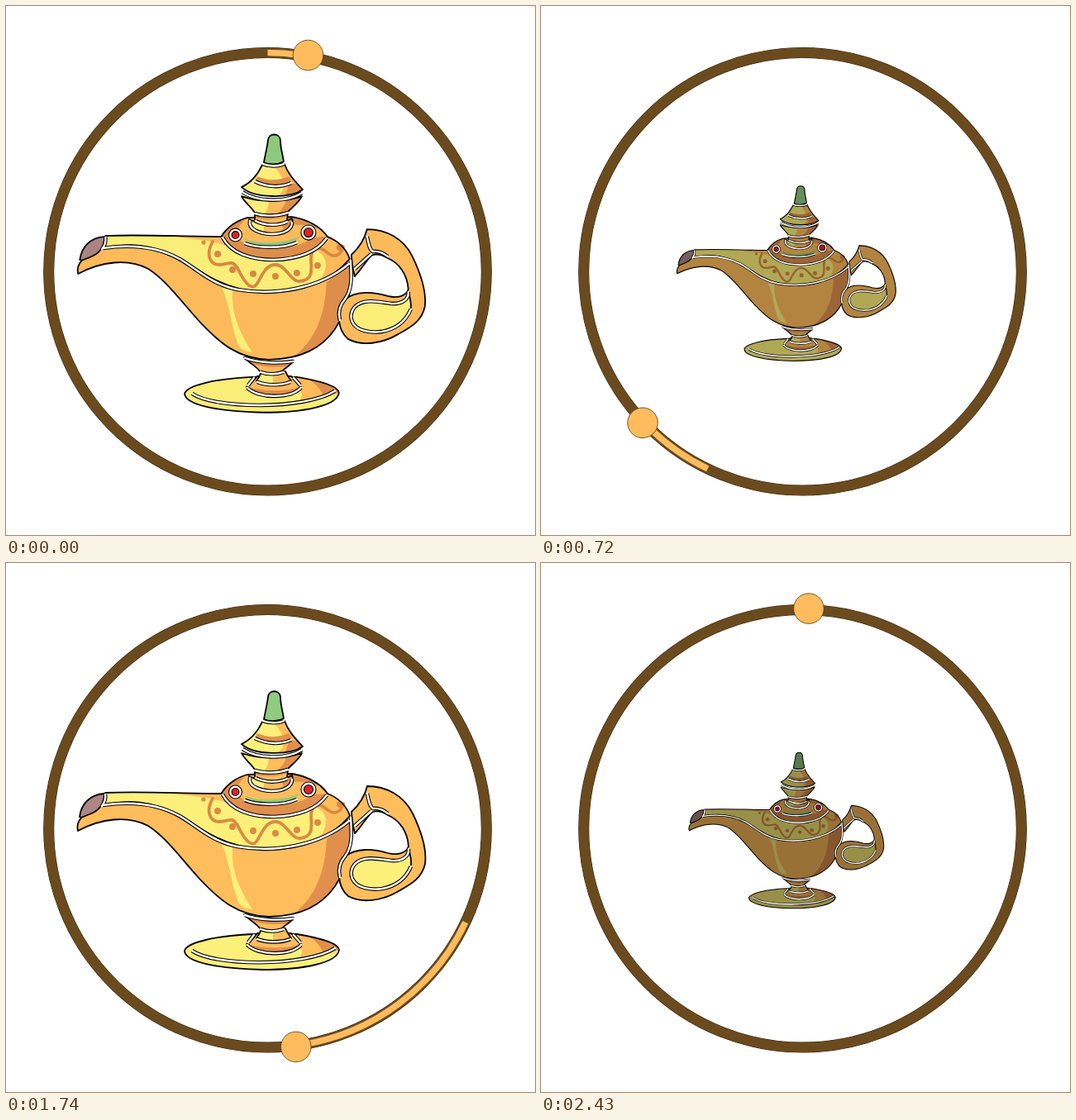
Write an HTML page that moves like this. It is 640 by 640 pixels and loops after 2.52 s.

```html
<!DOCTYPE html>
<html lang="en">
<head>
<meta charset="utf-8">
<title>Lamp loader</title>
<style>
  html, body { margin: 0; width: 100%; height: 100%; overflow: hidden; background: #fff; }
  svg { display: block; width: 100vw; height: 100vh; }
  .o { fill: var(--o); } .y { fill: var(--y); } .s { fill: var(--s); }
  .g { fill: var(--g); } .r { fill: var(--r); } .n { fill: var(--n); }
  .swirl { fill: none; stroke: var(--d); stroke-width: 3.8; stroke-linecap: round; }
  .dots { fill: var(--d); }
  .line { fill: none; stroke: #000; stroke-width: 1.8; stroke-linejoin: round; }
  .edge { fill: none; stroke: #000; stroke-width: 4.6; }
  .gap { fill: none; stroke: #fff; stroke-width: 2.4; stroke-linecap: round; }
</style>
</head>
<body>
<svg viewBox="0 0 640 640">
  <g fill="none">
    <circle cx="316.5" cy="321.3" r="264.8" stroke="#2c1e0c" stroke-width="13"/>
    <circle cx="316.5" cy="321.3" r="264.8" stroke="#6b4b1e" stroke-width="12"/>
    <circle id="trail" cx="316.5" cy="321.3" r="264.8" stroke="#ffbc5e" stroke-width="7.6"
      pathLength="360" transform="rotate(-90 316.5 321.3)"/>
  </g>
  <circle id="dot" r="18.3" fill="#ffbc5e" stroke="#54390f" stroke-width=".8"/>
  <g id="lamp"></g>
</svg>
<script>
const $ = id => document.getElementById(id);
const LOOP = 2520, STEP = 30, LAST = 2430;

const colors = {
  o: [255, 189, 92], y: [253, 240, 122], s: [224, 144, 76], g: [143, 203, 128],
  r: [224, 32, 42], n: [171, 134, 133], d: [218, 139, 66]
};

// Outlined parts, back to front: [fill class, path, shading as [class, path] pairs]
const parts = [
  ['o', 'M87 324C85 316 88 310 95 305C103 299 109 294 118 293C150 288 178 291 205 305C230 319 248 335 275 342C320 352 372 345 417 311C420 340 413 368 398 391C382 414 358 427 318 428C280 427 258 407 236 384C212 358 195 333 172 318C147 305 115 309 87 324Z', [
    ['s', 'M388 334C386 372 376 404 346 426C382 418 402 388 412 364C419 342 419 328 417 311Z'],
    ['y', 'M261 341L274 344C272 372 283 396 298 419C290 418 284 416 281 410C272 389 272 364 261 341Z']]],
  ['y', 'M120 278C165 276 212 279 258 279L389 279C402 284 412 294 416 306C388 338 350 347 317 347C285 346 258 336 235 321C207 303 185 290 150 289C138 289 129 291 117 293Z', [
    ['o', 'M203 279L262 279L268 291C256 285 236 283 203 279Z'],
    ['o', 'M388 280C402 284 412 294 416 306C406 318 393 327 380 333C390 316 391 302 372 294Z'],
    ['swirl', 'M250 285C241 301 247 313 258 313C270 313 273 305 281 319C288 333 296 345 303 337C309 329 313 313 326 313C339 313 345 335 356 333C381 330 361 302 374 294C385 289 388 303 398 302C405 301 407 296 408 291']]],
  ['n', 'M89 307C91 292 101 280 119 279C119 292 112 300 101 304C95 306 91 309 89 307Z'],
  ['o', 'M261 278C268 267 280 259 292 256L346 255C365 258 381 267 389 279C381 294 366 302 346 306C316 311 276 304 261 278Z', [
    ['s', 'M261 278C268 267 280 259 292 256C282 264 276 274 284 284C306 300 352 295 372 280L389 279C381 294 366 302 346 306C316 311 276 304 261 278Z'],
    ['s', 'M334 262L346 255C360 257 372 263 378 269C360 263 348 266 334 262Z'],
    ['g', 'M287 281C305 289 335 288 355 279C348 292 302 295 287 281Z']]],
  ['y', 'M294 258C308 265 334 264 346 257C349 265 345 271 337 274C324 278 306 276 296 269Z', [
    ['o', 'M312 263C324 264 338 262 346 257C349 265 345 271 337 274C329 276 320 276 312 275Z'],
    ['s', 'M333 262L346 257C349 265 345 271 337 274Z']]],
  ['o', 'M301 250C313 254 330 253 341 249L340 261C328 266 312 266 301 261Z', [
    ['s', 'M301 250C313 254 330 253 341 249L341 254C328 259 313 259 301 256Z']]],
  ['o', 'M285 230C304 237 336 238 358 230C355 237 347 243 341 249C330 253 312 254 301 250C297 243 288 237 285 230Z', [
    ['y', 'M285 230C295 234 306 236 318 236C318 242 316 247 313 251L301 250C297 243 288 237 285 230Z'],
    ['s', 'M339 234L358 230C355 237 347 243 341 249L326 252C334 247 338 240 339 234Z']]],
  ['y', 'M310 192C318 195 329 195 337 191C342 205 351 213 359 222C343 233 300 233 285 219C298 213 305 203 310 192Z', [
    ['o', 'M324 194L337 191C342 205 351 213 359 222C351 227 340 230 328 230C341 223 337 206 324 194Z'],
    ['s', 'M304 206C318 212 330 211 342 206L346 211C332 219 314 219 301 212Z'],
    ['s', 'M343 214L352 215L359 222L338 229Z']]],
  ['g', 'M312 189C314 178 316 171 317 162C318 153 331 153 332 162C332 172 335 180 336 188C329 192 318 192 312 189Z'],
  ['y', 'M216 469C219 459 254 451 298 449L352 449C376 453 402 459 403 468C401 484 360 492 310 492C258 491 216 483 216 469Z', [
    ['o', 'M330 449L352 449C376 453 402 459 403 468C390 474 374 478 352 480C360 474 366 465 330 449Z'],
    ['s', 'M368 453C386 456 402 461 403 468L384 471C380 464 376 458 368 453Z']]],
  ['o', 'M291 461C297 457 301 452 304 448L345 448C350 453 354 456 357 461C344 476 304 476 291 461Z', [
    ['s', 'M291 461C312 467 338 467 357 461C344 476 304 476 291 461Z']]],
  ['y', 'M309 442L338 442C340 447 343 451 345 454C331 460 314 459 303 454C306 450 308 446 309 442Z', [
    ['o', 'M323 442L338 442L345 454C339 457 331 458 323 458Z']]],
  ['o', 'M288 425C306 431 330 432 348 429C345 435 337 438 334 442C326 445 315 445 307 442C303 436 294 432 288 425Z', [
    ['s', 'M288 425C306 431 330 432 348 429L342 436C325 438 306 437 296 432Z']]],
  ['o', 'M437 270C460 270 481 281 492 303C504 328 509 349 507 364C503 382 489 389 475 397C455 409 430 412 414 403C400 391 400 368 411 355C423 344 445 346 462 351C474 354 484 351 487 343C486 325 476 311 462 305C454 300 448 299 442 302C436 308 430 319 422 327L419 313L418 301C428 292 434 282 437 270Z'],
  ['y', 'M487 346C488 356 478 361 466 360C452 358 444 356 434 358C420 361 415 372 419 382C424 393 440 396 455 394C472 391 484 381 490 367C491 358 489 352 487 346Z']
];

// Light seams between parts
const seams = [
  'M117 293C150 288 181 290 210 306C232 319 249 337 280 343C325 351 380 342 415 312',
  'M120 280C121 285 119 290 116 294',
  'M262 280C272 299 296 307 324 307C352 306 376 298 388 281',
  'M289 287C304 293 334 294 352 286',
  'M295 260C293 270 306 275 321 276C337 276 346 270 346 262',
  'M302 260C314 266 329 266 340 261',
  'M301 251C313 255 330 254 341 250',
  'M286 225C304 237 339 238 358 226',
  'M301 212C315 219 332 220 345 214',
  'M311 191C318 194 330 194 336 191',
  'M289 426C306 432 330 433 348 430',
  'M308 443C316 446 327 446 336 443',
  'M304 455C314 459 331 460 344 455',
  'M292 462C304 475 344 476 357 462',
  'M300 450L293 459M348 450L356 459',
  'M225 469C252 488 362 489 398 466',
  'M437 279C439 288 440 295 444 297C452 296 457 299 462 303',
  'M442 300L422 318',
  'M417 308C418 325 420 342 410 355C403 363 402 372 404 380',
  'M490 367C484 381 472 391 455 394C440 396 424 393 419 382C415 372 420 361 434 358C444 356 452 358 466 360C478 361 488 356 487 346'
];

const path = (cls, d) => `<path class="${cls}" d="${d}"/>`;
const disc = (cls, x, y, r) => `<circle class="${cls}" cx="${x}" cy="${y}" r="${r}"/>`;
const spots = [[239, 286], [256, 300], [274, 319], [299, 324], [326, 327], [352, 323], [377, 314], [404, 292]];
const gems = [[277.5, 277, 6.2], [366, 274, 7.3]];

let art = '';
parts.forEach(([cls, d, shades = []], i) => {
  art += path(cls, d) + shades.map(s => path(...s)).join('');
  if (i === 1) art += spots.map(([x, y], n) => disc('dots', x, y, n ? 4 : 2.6)).join('');
  art += path('line', d);
});
art += seams.map(d => path('edge', d)).join('') + seams.map(d => path('gap', d)).join('');
for (const [x, y, r] of gems) {
  art += disc('r', x, y, r) + disc('edge', x, y, r) + disc('gap', x, y, r);
}
$('lamp').innerHTML = art;

const clamp = x => Math.min(1, Math.max(0, x));
const smooth = x => x * x * (3 - 2 * x);

// 0 = full size and bright, 1 = small and dim
function shrink(t) {
  if (t < 580) return clamp((t + 20) / 600);
  if (t < 1770) return 1 - clamp((t - 570) / 600);
  return clamp((t - 1770) / 600);
}

function draw(t) {
  const laps = Math.min((t + 30) / 1200, 2);
  const u = laps % 1;
  const head = 360 * u;
  const tail = 360 * (laps < 1 ? clamp((u - .125) / .875) : .38 * u + .62 * u * u);
  const len = Math.max(0, head - tail);
  const trail = $('trail');
  trail.setAttribute('stroke-dasharray', `${len} 720`);
  trail.setAttribute('stroke-dashoffset', -tail);
  trail.style.visibility = len > .01 ? 'visible' : 'hidden';

  const a = (head + 1.6) * Math.PI / 180;
  $('dot').setAttribute('cx', 316.5 + 266.3 * Math.sin(a));
  $('dot').setAttribute('cy', 321.3 - 266.3 * Math.cos(a));

  const x = shrink(t);
  const size = 1 - .44 * smooth(x);
  const lamp = $('lamp');
  lamp.setAttribute('transform',
    `translate(296.7 323.5) scale(${size}) translate(-296.7 -323.5)`);
  for (const [key, rgb] of Object.entries(colors)) {
    lamp.style.setProperty('--' + key, `rgb(${rgb.map(c => Math.round(c * (1 - .4 * x)))})`);
  }
}

const start = performance.now();
function tick() {
  const t = (performance.now() - start) % LOOP;
  draw(Math.min(LAST, Math.floor(t / STEP) * STEP));
  requestAnimationFrame(tick);
}
tick();
</script>
</body>
</html>
```
